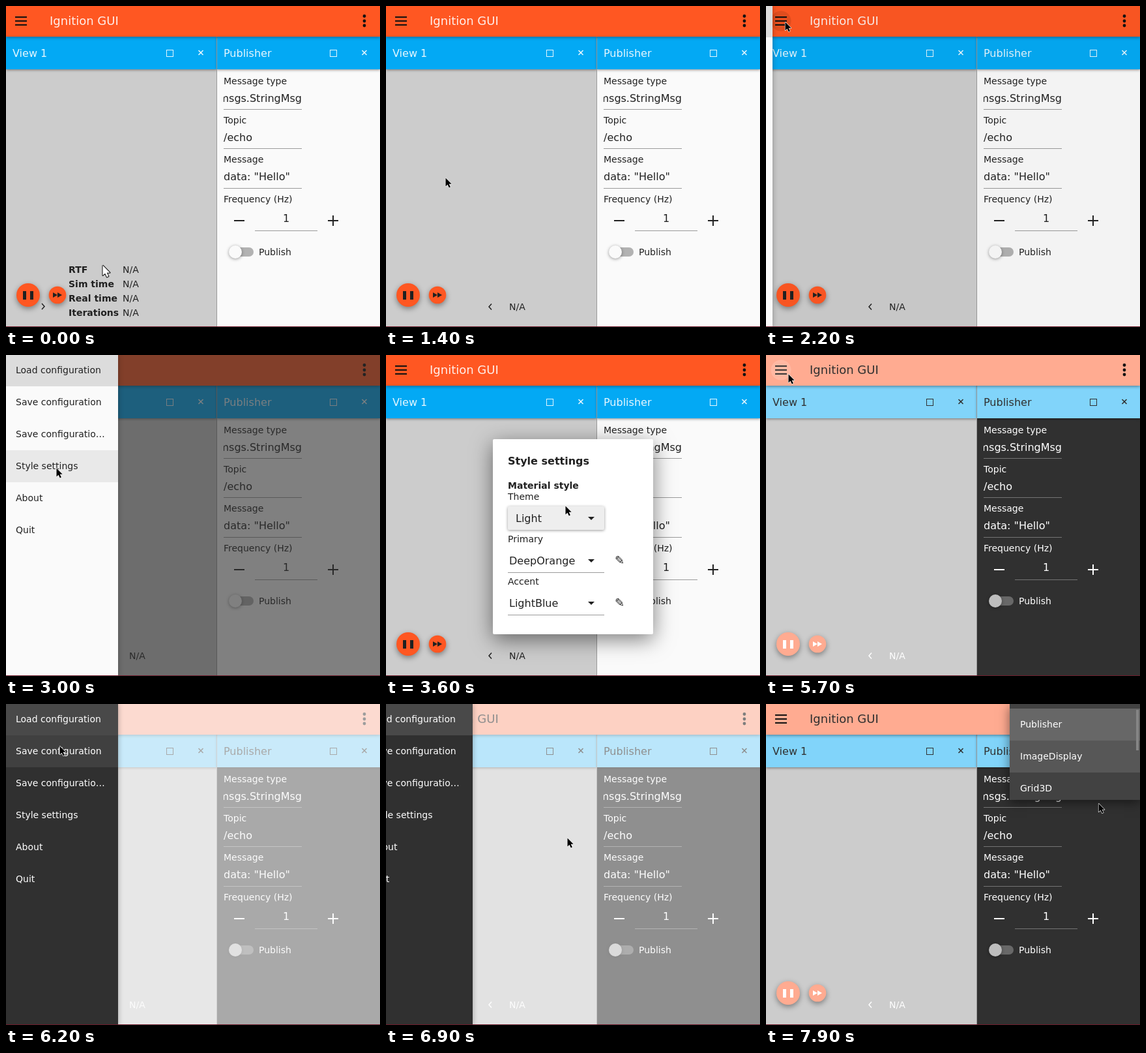
Animation, 574 px wide and 492 px high, one loop 8000 ms. Source, as an HTML page with a canvas:

```html
<!DOCTYPE html>
<html lang="en">
<head>
<meta charset="utf-8">
<title>Ignition GUI</title>
<style>
html, body { margin: 0; width: 100%; height: 100%; overflow: hidden; }
canvas { display: block; width: 574px; height: 492px; }
</style>
</head>
<body>
<canvas id="stage" width="574" height="492"></canvas>
<script>
const ctx = document.getElementById('stage').getContext('2d');
const W = 574, H = 492, LOOP = 8000, STEP = 100;
const DRAWER_WIDTH = 172, ROW = 49;

const LIGHT = {
  primary: '#ff5722', accent: '#03a9f4', title: 'rgba(255,255,255,.9)', icon: '#111',
  page: '#fafafa', text: '#212121', line: '#9a9a9a', popup: '#fff', button: '#eee',
  track: '#b2b2b2', knob: '#fafafa', dim: '48,48,48', focus: '#dcdcdc', hover: '#e9e9e9',
  ring: 'rgba(0,0,0,.1)'
};
const DARK = {
  primary: '#ffab91', accent: '#81d4fa', title: '#303030', icon: '#111',
  page: '#303030', text: '#fff', line: '#747474', popup: '#424242', button: '#575757',
  track: '#686868', knob: '#bdbdbd', dim: '250,250,250', focus: '#494949', hover: '#404040',
  ring: 'rgba(255,255,255,.16)'
};

// time, x, y of the pointer tip
const POINTER = [
  [0, 148, 397], [400, 50, 468], [500, 50, 468], [600, 51, 468], [800, 51, 468],
  [1400, 91, 263], [1500, 91, 263], [2000, 29, 24], [2300, 29, 24], [3000, 77, 173],
  [3200, 77, 173], [3600, 275, 231], [3800, 275, 231], [4200, 262, 296], [4400, 262, 296],
  [4800, 460, 226], [4900, 460, 226], [5700, 34, 29], [6000, 34, 29], [6700, 278, 205],
  [6900, 278, 205], [7100, 559, 23], [7600, 559, 23], [7900, 510, 152]
];

let theme = LIGHT;

const mix = (a, b, k) => a + (b - a) * k;
function ease(t, start, end) {
  const k = Math.min(1, Math.max(0, (t - start) / (end - start)));
  return k * k * (3 - 2 * k);
}
const pulse = (t, openAt, opened, closeAt, closed) => ease(t, openAt, opened) - ease(t, closeAt, closed);
const during = (t, start, end) => t >= start && t < end;

function pointerAt(t) {
  const i = POINTER.findIndex(key => key[0] > t);
  if (i < 0) return POINTER[POINTER.length - 1].slice(1);
  const [t0, x0, y0] = POINTER[i - 1], [t1, x1, y1] = POINTER[i];
  const k = ease(t, t0, t1);
  return [Math.round(mix(x0, x1, k)), Math.round(mix(y0, y1, k))];
}

function rect(x, y, w, h, color) {
  ctx.fillStyle = color;
  ctx.fillRect(x, y, w, h);
}
function circle(x, y, r, color) {
  ctx.fillStyle = color;
  ctx.beginPath();
  ctx.arc(x, y, r, 0, Math.PI * 2);
  ctx.fill();
}
function roundRect(x, y, w, h, r, color) {
  ctx.fillStyle = color;
  ctx.beginPath();
  ctx.roundRect(x, y, w, h, r);
  ctx.fill();
}
function polygon(points, color) {
  ctx.fillStyle = color;
  ctx.beginPath();
  points.forEach(([x, y]) => ctx.lineTo(x, y));
  ctx.closePath();
  ctx.fill();
}
function stroke(points, color, width) {
  ctx.strokeStyle = color;
  ctx.lineWidth = width;
  ctx.beginPath();
  points.forEach(([x, y]) => ctx.lineTo(x, y));
  ctx.stroke();
}
function text(string, x, y, size = 14, color = theme.text, weight = '', align = 'left') {
  ctx.font = `${weight} ${size}px "DejaVu Sans", sans-serif`;
  ctx.textAlign = align;
  ctx.fillStyle = color;
  ctx.fillText(string, x, y);
}
function shadowed(blur, offset, alpha, draw) {
  ctx.save();
  ctx.shadowColor = `rgba(0,0,0,${alpha})`;
  ctx.shadowBlur = blur;
  ctx.shadowOffsetY = offset;
  draw();
  ctx.restore();
}
// Fades and scales a popup around a point.
function popup(k, x, y, draw) {
  if (k <= 0) return;
  const scale = mix(0.9, 1, k);
  ctx.save();
  ctx.globalAlpha = k;
  ctx.translate(x, y);
  ctx.scale(scale, scale);
  ctx.translate(-x, -y);
  draw();
  ctx.restore();
}

function panelHeader(x, w, title, boxX, closeX) {
  shadowed(4, 1, 0.45, () => rect(x, 47, w, 50, theme.accent));
  text(title, x + 10, 78, 16, theme.title);
  ctx.strokeStyle = theme.title;
  ctx.lineWidth = 1;
  ctx.strokeRect(boxX + 0.5, 67.5, 10, 10);
  stroke([[closeX - 3.5, 68], [closeX + 3.5, 75]], theme.title, 1.6);
  stroke([[closeX + 3.5, 68], [closeX - 3.5, 75]], theme.title, 1.6);
}

function toolbar() {
  shadowed(5, 1, 0.45, () => rect(0, 0, W, 47, theme.primary));
  text('Ignition GUI', 67, 29, 18, theme.title);
  [16, 22, 28].forEach(y => rect(14, y, 18, 2, theme.icon));
  [15.5, 23, 30].forEach(y => circle(550, y, 2.4, theme.icon));
}

function publisher() {
  rect(324, 97, 250, 394, theme.page);
  const fields = [['Message type', 120, 158], ['Topic', 180, 218], ['Message', 240, 279]];
  fields.forEach(([label, y, lineY]) => {
    text(label, 334, y);
    rect(334, lineY, 120, 1, theme.line);
  });
  ctx.save();
  ctx.beginPath();
  ctx.rect(334, 130, 120, 28);
  ctx.clip();
  text('ignition.msgs.StringMsg', 454, 147, 16, theme.text, '', 'right');
  ctx.restore();
  text('/echo', 334, 207, 16);
  text('data: "Hello"', 334, 267, 16);
  text('Frequency (Hz)', 334, 301);
  text('1', 430, 331, 16, theme.text, '', 'center');
  rect(382, 344, 96, 1, theme.line);
  rect(350, 328, 16, 2, theme.text);
  rect(494, 328, 16, 2, theme.text);
  rect(501, 321, 2, 16, theme.text);
  roundRect(344, 370, 36, 14, 7, theme.track);
  shadowed(5, 1, 0.4, () => circle(352, 377, 10, theme.knob));
  text('Publish', 388, 382);
}

function chevron(x, y, direction) {
  stroke([[x - 2 * direction, y - 4.5], [x + 2 * direction, y], [x - 2 * direction, y + 4.5]], theme.text, 1.5);
}

function view(t) {
  rect(0, 97, 323, 394, '#ccc');
  shadowed(9, 3, 0.4, () => circle(34, 443, 18, theme.primary));
  shadowed(9, 3, 0.4, () => circle(79, 443, 13.3, theme.primary));
  rect(26, 437, 5, 13, theme.text);
  rect(37, 437, 5, 13, theme.text);
  [72, 79].forEach(x => polygon([[x, 439], [x + 7, 443], [x, 447]], theme.text));

  if (t < 800) {
    if (t >= 300) circle(57, 461, 16, theme.ring);
    chevron(57, 460.5, 1);
    ['RTF', 'Sim time', 'Real time', 'Iterations'].forEach((label, i) => {
      text(label, 96, 409 + 22 * i, 14, theme.text, 'bold');
      text('N/A', 179, 409 + 22 * i);
    });
  } else {
    const x = Math.round(mix(277, 189, ease(t, 800, 1100)));
    chevron(x - 29, 461, -1);
    text('N/A', x, 466);
  }
}

function rings(t) {
  if (during(t, 1900, 2700) || during(t, 5600, 6300)) circle(23, 23, 15.5, theme.ring);
  if (during(t, 7400, 7900)) circle(550, 23, t < 7500 ? 11 : 15.5, theme.ring);
}

function drawer(position, px, py) {
  if (position <= 0) return;
  rect(0, 0, W, H, `rgba(${theme.dim},${0.6 * position})`);
  const x = Math.round(DRAWER_WIDTH * (position - 1));
  shadowed(8, 0, 0.3, () => rect(x, 0, DRAWER_WIDTH, H, theme.page));
  const items = ['Load configuration', 'Save configuration', 'Save configuratio…', 'Style settings', 'About', 'Quit'];
  items.forEach((label, i) => {
    const y = ROW * i - 1;
    const hovered = px < x + DRAWER_WIDTH && py >= y && py < y + ROW;
    if (i === 0 || hovered) rect(x, y, DRAWER_WIDTH, ROW, i === 0 ? theme.focus : theme.hover);
    text(label, x + 15, y + 29);
  });
}

function comboArrow(y) {
  polygon([[310, y - 2], [320, y - 2], [315, y + 3]], theme.text);
}

function styleDialog() {
  shadowed(32, 8, 0.5, () => roundRect(164, 129, 246, 299, 2, theme.popup));
  text('Style settings', 187, 168, 16, theme.text, 'bold');
  text('Material style', 187, 205, 14, theme.text, 'bold');
  text('Theme', 187, 222);
  shadowed(4, 1, 0.4, () => roundRect(187, 232, 148, 36, 2, theme.button));
  text(theme === DARK ? 'Dark' : 'Light', 199, 256, 16);
  comboArrow(250);
  [['Primary', 'DeepOrange', 287], ['Accent', 'LightBlue', 352]].forEach(([label, value, y]) => {
    text(label, 187, y);
    text(value, 189, y + 34, 16);
    comboArrow(y + 28);
    rect(187, y + 46, 148, 1, theme.line);
    text('✎', 351, y + 34, 18);
  });
}

function themeList(py) {
  shadowed(16, 4, 0.4, () => roundRect(187, 226, 148, 98, 2, theme.popup));
  rect(187, py < 275 ? 226 : 275, 148, ROW, theme.hover);
  text('Light', 203, 256, 16);
  text('Dark', 203, 305, 16);
}

function pluginMenu() {
  shadowed(16, 4, 0.5, () => rect(374, 0, 200, 147, theme.popup));
  rect(374, 7, 200, ROW, '#676767');
  rect(374, 56, 200, ROW, '#575757');
  ['Publisher', 'ImageDisplay', 'Grid3D'].forEach((label, i) => text(label, 390, 36 + ROW * i));
  rect(568, 9, 4, 62, '#858585');
}

function pointer(t, x, y) {
  const large = t < 600;
  const size = large ? 1.2 : 1;
  const outline = [[0, 0], [0, 13], [3, 10.2], [5.3, 15], [7.4, 14], [5.2, 9.3], [9.2, 9.3]]
    .map(([dx, dy]) => [x + 0.5 + dx * size, y + 0.5 + dy * size]);
  ctx.lineJoin = 'round';
  stroke([...outline, outline[0]], large ? '#111' : '#fff', large ? 2 : 1.2);
  polygon(outline, large ? '#fff' : '#000');
  ctx.lineJoin = 'miter';
}

function render(t) {
  theme = t < 4300 ? LIGHT : DARK;
  const [px, py] = pointerAt(t);
  view(t);
  publisher();
  panelHeader(0, 323, 'View 1', 246, 299);
  panelHeader(324, 250, 'Publisher', 497, 550);
  rect(323, 47, 1, 444, '#999');
  toolbar();
  rings(t);
  drawer(pulse(t, 2150, 2500, 3150, 3450) + pulse(t, 5850, 6200, 6808, 7108), px, py);
  popup(pulse(t, 3250, 3550, 4700, 4900), 287, 278, styleDialog);
  popup(pulse(t, 3800, 4000, 4300, 4500), 261, 250, () => themeList(py));
  popup(ease(t, 7620, 7850), 574, 0, pluginMenu);
  rect(0, 491, W, 1, '#6d1a2a');
  pointer(t, px, py);
}

const startTime = performance.now();
function tick() {
  const t = (performance.now() - startTime) % LOOP;
  render(Math.floor(t / STEP) * STEP);
  requestAnimationFrame(tick);
}
tick();
</script>
</body>
</html>
```
